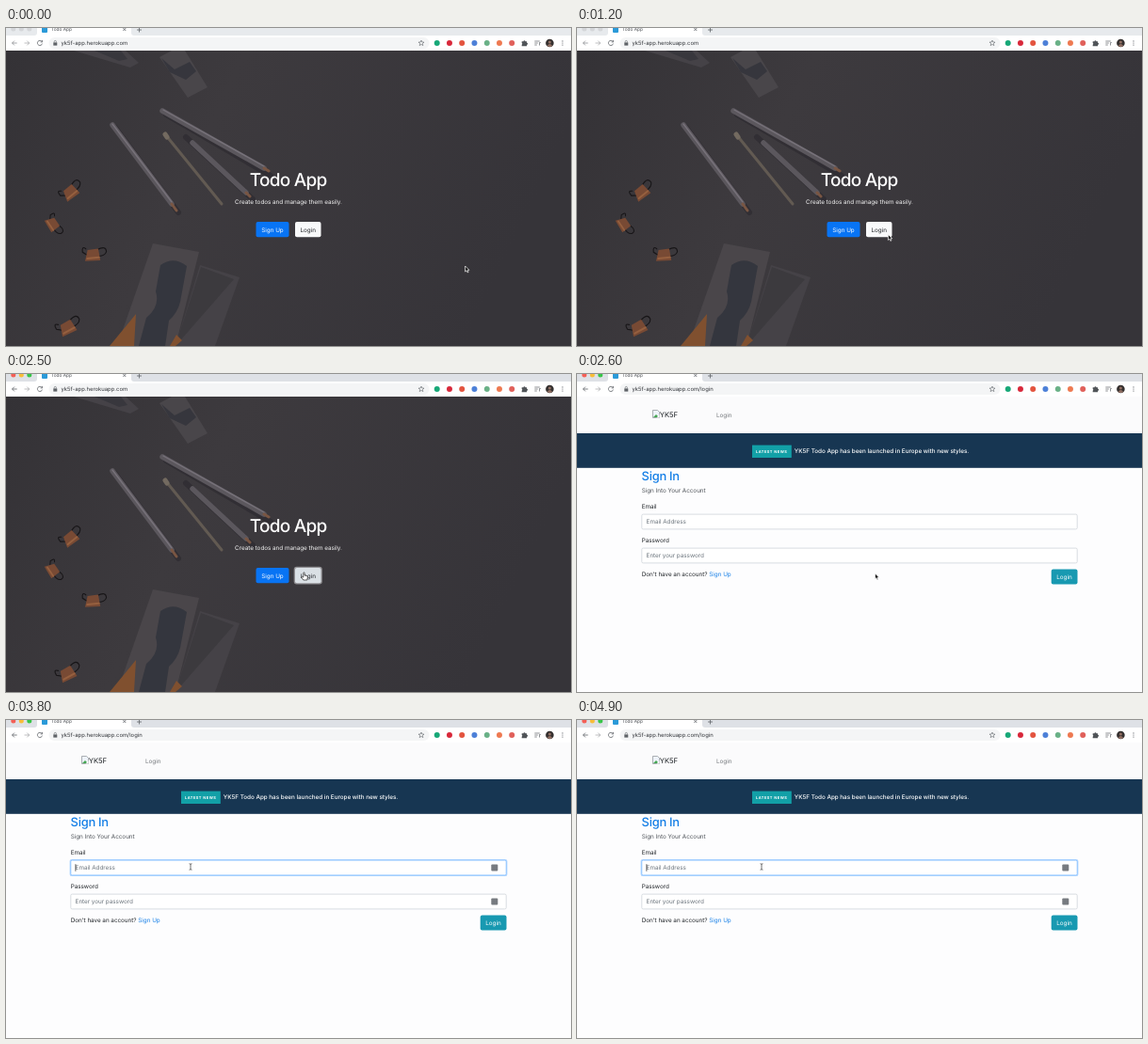
Recreate the animation shown at these times as an HTML page. Size 600 px wide and 338 px high, loop 5000 ms.

```html
<!DOCTYPE html>
<html lang="en">
<head>
<meta charset="utf-8">
<title>Todo App</title>
<style>
html, body { margin: 0; width: 100%; height: 100%; overflow: hidden; }
svg { display: block; width: 100vw; height: 100vh; }
text { font: 6.35px Inter, "Open Sans", sans-serif; letter-spacing: -.005em; text-rendering: geometricPrecision; fill: #212529; }
.mid { text-anchor: middle; }
.line { fill: none; stroke: #5f6368; stroke-width: .8; }
</style>
</head>
<body>
<svg viewBox="0 0 600 338" preserveAspectRatio="none">
  <defs>
    <linearGradient id="desk" x2="1" y2=".25">
      <stop offset="0" stop-color="#343236"/>
      <stop offset=".4" stop-color="#3d3a3e"/>
      <stop offset="1" stop-color="#363439"/>
    </linearGradient>
    <g id="clip" fill="none" stroke-linecap="round">
      <path d="M-9-5Q-14-8-12-1L-3 3M3-6Q12-12 13-5 12 0 4 1" stroke="#171517" stroke-width="1.1"/>
      <path d="M-7-4L4-7 8 5-8 8z" fill="#784a34"/>
      <path d="M-6 5L6 2" stroke="#96603f" stroke-width="2"/>
    </g>
  </defs>

  <g id="home">
    <rect y="24" width="600" height="314" fill="url(#desk)"/>
    <path d="M72 24h55l14 13-9 5z" fill="#454247"/>
    <path d="M94 24h28l7 9-9 2z" fill="#38373d"/>
    <path d="M163 31l30 43 21-11-24-39h-14z" fill="#49464a"/>
    <path d="M165 32l14 12 16-8 7 10-11 9-17-8z" fill="#36363d"/>
    <path d="M156 229l49 9-25 100h-62z" fill="#4a464a"/>
    <path d="M206 252l42 13-26 73h-42z" fill="#454247"/>
    <path d="M180 338l27-84 35 13z" fill="#3c3a3e"/>
    <path d="M164 252q14-10 28 1l-7 38q-3 12-12 20l-4 27h-28l8-30q15-12 10-28z" fill="#34363e"/>
    <path d="M110 338l28-34-2 34zM181 326l6 6-7 6h-6z" fill="#80502f"/>
    <g fill="none" stroke-linecap="round">
      <path d="M116 106L183 196M170 92L281 157M191 116L262 182" stroke="#252328" stroke-width="6" opacity=".45"/>
      <path d="M113 103L176 187M166 88L274 149M198 122L255 175" stroke="#5b575d" stroke-width="5.5"/>
      <path d="M113 102L176 185M167 87L274 147" stroke="#77727a" stroke-width="1.4"/>
      <path d="M169 113L229 187" stroke="#625a52" stroke-width="3"/>
      <path d="M169 113l2 3" stroke="#736a60" stroke-width="5"/>
      <path d="M176 187l5 7M274 149l5 3M255 175l4 4" stroke="#795643" stroke-width="3"/>
    </g>
    <use href="#clip" transform="translate(69 174) rotate(-25)"/>
    <use href="#clip" transform="translate(50 209) rotate(70) scale(.9)"/>
    <use href="#clip" transform="translate(93 241) rotate(8)"/>
    <use href="#clip" transform="translate(66 318) rotate(-15) scale(1.05)"/>
    <text class="mid" x="299.6" y="168" style="font-size:19px;font-weight:500;letter-spacing:-.75px;fill:#fff">Todo App</text>
    <text class="mid" x="300" y="186.7" style="fill:#f4f4f4">Create todos and manage them easily.</text>
    <rect x="265.5" y="206" width="35" height="16.3" rx="2" fill="#0874f4"/>
    <text class="mid" x="283" y="216.5" style="fill:#fff">Sign Up</text>
    <rect id="ring" x="305.7" y="204.8" width="30.1" height="18.7" rx="3" fill="#d8d9db" opacity=".55"/>
    <rect id="button" x="307" y="206" width="27.5" height="16.3" rx="2"/>
    <text class="mid" x="320.7" y="216.5">Login</text>
  </g>

  <g id="login">
    <rect y="24" width="600" height="314" fill="#fdfdfe"/>
    <rect y="24" width="600" height="39" fill="#fbfbfc"/>
    <path d="M80.5 38.5h5l2 2v6h-7z" fill="#eef3fa" stroke="#8b9095" stroke-width=".7"/>
    <path d="M81 46l3-3 3 3z" fill="#45a552"/>
    <path d="M84.5 46.5l3-3.5v3.5z" fill="#fff"/>
    <text x="87.8" y="46.2" style="font-size:7.7px">YK5F</text>
    <text x="148" y="45.8" style="fill:#73777b">Login</text>
    <rect y="63" width="600" height="36.8" fill="#173652"/>
    <rect x="186" y="75.6" width="41.8" height="13.4" fill="#12a0a7"/>
    <text x="190" y="83.9" style="font-size:4px;font-weight:700;letter-spacing:.45px;fill:#fff">LATEST NEWS</text>
    <text x="230.8" y="83.9" style="font-weight:500;fill:#fff">YK5F Todo App has been launched in Europe with new styles.</text>
    <text x="68.6" y="112.6" style="font-size:12.9px;font-weight:500;letter-spacing:-.02em;fill:#147ee6">Sign In</text>
    <text x="68.7" y="126.4" style="fill:#50555a">Sign Into Your Account</text>
    <text x="68.7" y="143.1">Email</text>
    <text x="68.7" y="179.1">Password</text>
    <rect id="glow" x="67.6" y="147.9" width="464.8" height="18.2" rx="2.2" fill="#b3d7ff"/>
    <g fill="#fff" stroke="#ced4da" stroke-width=".8">
      <rect id="email" x="68.8" y="149.1" width="462.4" height="15.8" rx="1.5"/>
      <rect x="68.8" y="185.1" width="462.4" height="15.8" rx="1.5"/>
    </g>
    <text x="73.6" y="159.3" style="fill:#6c757d">Email Address</text>
    <text x="73.6" y="195.3" style="fill:#6c757d">Enter your password</text>
    <path id="caret" d="M73.9 153.2v7.6" stroke="#222" stroke-width=".7"/>
    <g id="fill" fill="#777b80">
      <rect x="515.3" y="153.4" width="7" height="7" rx="1"/>
      <rect x="515.3" y="189.4" width="7" height="7" rx="1"/>
    </g>
    <text x="68.7" y="214.8">Don't have an account? <tspan fill="#147ee6">Sign Up</tspan></text>
    <rect x="503.7" y="207.5" width="27.8" height="15.9" rx="2" fill="#1899b1"/>
    <text class="mid" x="517.5" y="217.8" style="fill:#fff">Login</text>
  </g>

  <g id="browser">
    <rect width="600" height="24" fill="#fff"/>
    <rect id="strip" width="600" height="8"/>
    <path d="M30 8q3 0 3-3V0h100v5q0 3 3 3z" fill="#fff"/>
    <g id="lights"><circle cx="7.8" cy="1" r="2.5"/><circle cx="16.3" cy="1" r="2.5"/><circle cx="24.8" cy="1" r="2.5"/></g>
    <rect x="38" y="-1" width="6" height="6" rx="1" fill="#2b9ad8"/>
    <text x="48" y="3.4" style="font-size:4.85px;fill:#4b4f54">Todo App</text>
    <path class="line" d="M124.3 0l3 3m0-3l-3 3M139 2h5m-2.5-2.5v5"/>
    <rect x="45.5" y="10" width="404" height="12" rx="6" fill="#f4f5f6"/>
    <path id="back" class="line" d="M11.7 16H6.5m2.4-2.4L6.5 16l2.4 2.4"/>
    <path class="line" d="M19.5 16h5.2m-2.4-2.4l2.4 2.4-2.4 2.4" opacity=".5"/>
    <path class="line" d="M38.1 14.4a2.6 2.6 0 1 0 .4 2.2M38.6 12.9v2h-2"/>
    <path d="M50.3 15.4h4v3.2h-4z" fill="#5f6368"/>
    <path class="line" d="M51.2 15.5v-1a1.1 1.1 0 0 1 2.2 0v1" style="stroke-width:.6"/>
    <text id="url" x="58.5" y="18.1" style="font-size:5.9px;letter-spacing:0;fill:#303338"></text>
    <path class="line" d="M441 13l.8 2 2.2.1-1.7 1.4.6 2.1-1.9-1.2-1.9 1.2.6-2.1-1.7-1.4 2.2-.1z" style="stroke-width:.6"/>
    <g id="addons"></g>
    <path d="M547.7 14.2h1.8a1 1 0 0 1 2 0h1.6v1.6a1 1 0 0 1 0 2v1.4h-5.4v-1.5a1 1 0 0 0 0-1.8z" fill="#505458"/>
    <path class="line" d="M561.3 14h5.5M561.3 16h3.5M561.3 18h2.5M566.5 18.5v-3h1.3" style="stroke-width:.7"/>
    <circle cx="577.4" cy="16" r="4.3" fill="#34302f"/>
    <circle cx="577.4" cy="15" r="1.5" fill="#927064"/>
    <path d="M574.6 19q2.8-4 5.6 0-2.8 2-5.6 0z" fill="#927064"/>
    <g fill="#5f6368"><circle cx="591" cy="13.9" r=".6"/><circle cx="591" cy="16" r=".6"/><circle cx="591" cy="18.1" r=".6"/></g>
  </g>

  <g id="cursor">
    <path id="arrow" d="M0 0V6l1.4-1.3 1 2.2 1.1-.5-1-2.1h1.8z" fill="#111" stroke="#fff" stroke-width=".7"/>
    <path id="hand" d="M-.7-.7q.7-.8 1.3 0v2.7l2.6.6q.7.3.6 1.2L3.3 7H-.7l-2.2-3q0-1 1-.7l1.2.8z" fill="#fff" stroke="#222" stroke-width=".7"/>
    <path id="beam" d="M-1.4-3.3Q0-3.3 0-2.4 0-3.3 1.4-3.3M0-2.4V2.4M-1.4 3.3Q0 3.3 0 2.4 0 3.3 1.4 3.3" fill="none" stroke="#333" stroke-width=".7"/>
  </g>
</svg>
<script>
const $ = id => document.getElementById(id);
const show = (id, on) => $(id).style.display = on ? "" : "none";
const paint = (id, color) => $(id).setAttribute("fill", color);

$("addons").innerHTML = ["#18a878", "#d8283a", "#e3543f", "#4d80d8", "#6ab187", "#ee7951", "#e0605a"]
  .map((c, i) => `<circle cx="${457.7 + i * 13.25}" cy="16" r="3" fill="${c}"/>`).join("");

// Pointer stops: time, x, y
const stops = [
  [0, 487.6, 253], [600, 354.8, 227], [1300, 329, 219], [1900, 328, 218],
  [2300, 316.5, 212], [2800, 316.5, 212], [3500, 196, 156], [5000, 196, 156]
];

function pointer(t) {
  const i = stops.findIndex(s => s[0] > t);
  const [t0, x0, y0] = stops[i - 1], [t1, x1, y1] = stops[i];
  const p = (t - t0) / (t1 - t0), e = p * p * (3 - 2 * p);
  return [x0 + (x1 - x0) * e, y0 + (y1 - y0) * e];
}

function draw(t) {
  const active = t >= 1500, signin = t >= 2600, focused = t >= 3700;
  const [x, y] = pointer(t);

  show("home", !signin);
  show("login", signin);
  $("url").textContent = "yk5f-app.herokuapp.com" + (signin ? "/login" : "");
  paint("strip", active ? "#dee1e6" : "#e7eaed");
  const lights = active ? ["#f45f56", "#f8bd38", "#37c649"] : Array(3).fill("#d4d6d9");
  [...$("lights").children].forEach((c, i) => c.setAttribute("fill", lights[i]));
  $("back").style.opacity = active ? 1 : .7;

  const hover = t >= 2100 && !signin;
  paint("button", t >= 2400 ? "#dae0e5" : hover ? "#e2e6ea" : "#f8f9fa");
  show("ring", t >= 2400);

  show("fill", t >= 2900);
  show("glow", focused);
  $("email").setAttribute("stroke", focused ? "#80bdff" : "#ced4da");
  show("caret", focused && (t - 3700) % 1000 < 500);

  const typing = signin && (y > 149 && y < 165 || y > 185 && y < 201);
  $("cursor").setAttribute("transform", `translate(${x} ${y})`);
  show("hand", hover);
  show("beam", typing);
  show("arrow", !hover && !typing);
}

const start = performance.now();
function tick() {
  const t = (performance.now() - start) % 5000;
  draw(Math.floor(t / 100) * 100);
  requestAnimationFrame(tick);
}
tick();
</script>
</body>
</html>
```
